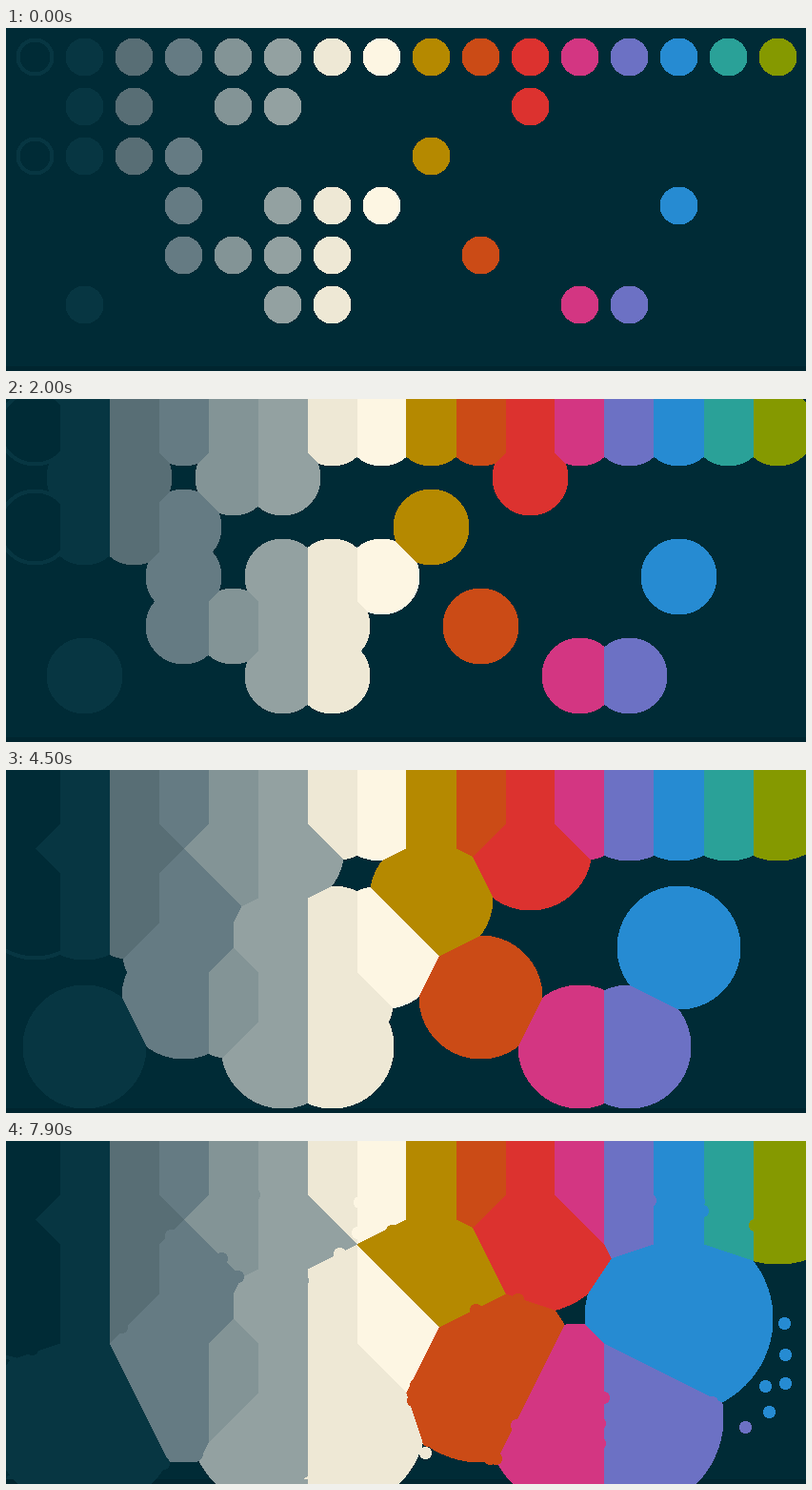
These frames come from a looping animation (840 by 360 pixels, 8000 ms). An HTML page with a canvas:

```html
<!DOCTYPE html>
<html lang="en">
<head>
<meta charset="utf-8">
<title>Growing palette</title>
<style>
  html, body { margin: 0; width: 100%; height: 100%; overflow: hidden; background: #002b36; }
  canvas { display: block; }
</style>
</head>
<body>
<canvas id="stage" width="840" height="360"></canvas>
<script>
const W = 840, H = 360, STEP = 100, LOOP = 8000;
const BAND_TOP = 355, PITCH = 52, RING = 4;
const DOT_COUNT = 150, DOT_START = 66;

const colors = [
  '002b36', '073642', '586e75', '657b83', '839496', '93a1a1', 'eee8d5', 'fdf6e3',
  'b58900', 'cb4b16', 'dc322f', 'd33682', '6c71c4', '268bd2', '2aa198', '859900'
];
const palette = colors.map(toPixel);
const background = palette[0], ringColor = palette[1], bandColor = toPixel('00252f');

// One hex digit per disc: its column, which is also its palette index.
const rows = ['0123456789abcdef', '1245a', '01238', '3567d', '34569', '156bc'];

// Sorted so that the lower colour value wins where two cells are equally near.
const seeds = rows.flatMap((row, j) => [...row].map(digit => {
  const index = parseInt(digit, 16);
  return { x: 30 + PITCH * index, y: 30 + PITCH * j, index };
})).sort((a, b) => parseInt(colors[a.index], 16) - parseInt(colors[b.index], 16));

const random = seededRandom(7);
const dots = Array.from({ length: DOT_COUNT }, () => ({
  x: Math.floor(random() * W),
  y: Math.floor(random() * H)
}));

const ctx = document.getElementById('stage').getContext('2d');
const image = ctx.createImageData(W, H);
const pixels = new Uint32Array(image.data.buffer);
const owner = new Uint8Array(W * H);
const distance = new Float32Array(W * H);

function toPixel(hex) {
  const n = parseInt(hex, 16);
  return (0xff000000 | (n & 255) << 16 | (n & 0xff00) | n >> 16) >>> 0;
}

function seededRandom(state) {
  return () => {
    state = (Math.imul(state, 1664525) + 1013904223) >>> 0;
    return state / 2 ** 32;
  };
}

function buildCells() {
  for (let y = 0, i = 0; y < H; y++) {
    for (let x = 0; x < W; x++, i++) {
      let best = Infinity;
      for (const s of seeds) {
        const d = (x - s.x) ** 2 + (y - s.y) ** 2;
        if (d < best) { best = d; owner[i] = s.index; }
      }
      distance[i] = Math.sqrt(best);
    }
  }
}

function drawDiscs(radius) {
  for (let i = 0; i < pixels.length; i++) {
    const d = distance[i], index = owner[i];
    if (d >= radius) pixels[i] = i < BAND_TOP * W ? background : bandColor;
    else pixels[i] = index === 0 && d >= radius - RING ? ringColor : palette[index];
  }
}

// A dot takes the colour of the cell it starts in.
function drawDot(dot, radius) {
  const color = palette[owner[dot.y * W + dot.x]], reach = Math.ceil(radius);
  const bottom = Math.min(BAND_TOP - 1, dot.y + reach);
  const right = Math.min(W - 1, dot.x + reach);
  for (let y = Math.max(0, dot.y - reach); y <= bottom; y++) {
    for (let x = Math.max(0, dot.x - reach); x <= right; x++) {
      if (Math.hypot(x - dot.x, y - dot.y) <= radius) pixels[y * W + x] = color;
    }
  }
}

function draw(step) {
  drawDiscs(20 + step);
  const dotRadius = (step - DOT_START) / 2;
  if (dotRadius > 0) dots.forEach(dot => drawDot(dot, dotRadius));
  ctx.putImageData(image, 0, 0);
}

let shown = -1;
function tick() {
  const step = Math.floor(((performance.now() - start) % LOOP) / STEP);
  if (step !== shown) draw(shown = step);
  requestAnimationFrame(tick);
}

buildCells();
const start = performance.now();
tick();
</script>
</body>
</html>
```
